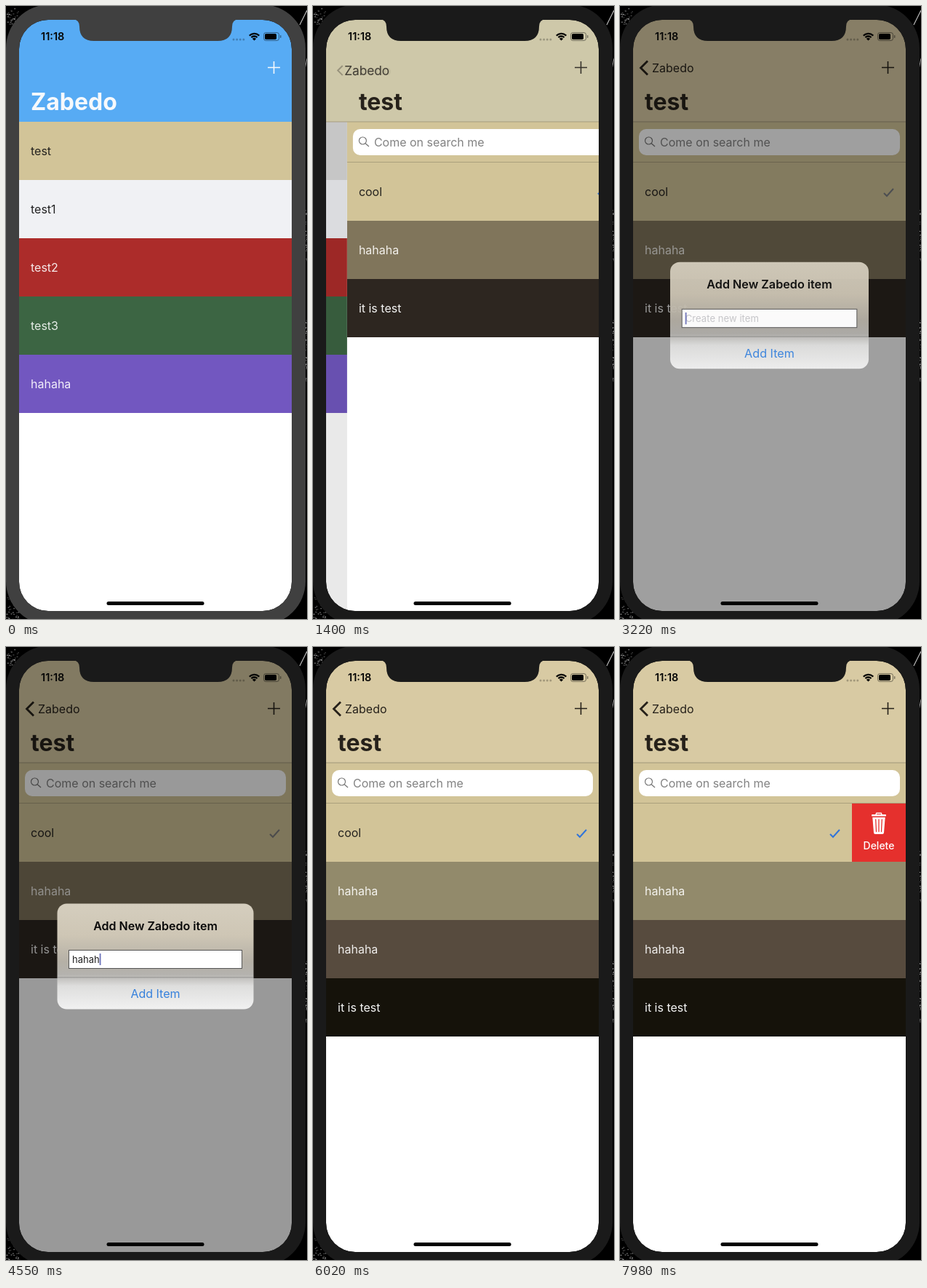
Animation, 414 px wide and 842 px high, one loop 8000 ms. Source, as an HTML page with a canvas:

```html
<!DOCTYPE html>
<html lang="en">
<head>
<meta charset="utf-8">
<title>To-do list</title>
<style>
html, body { margin: 0; width: 100%; height: 100%; overflow: hidden; background: #000; }
canvas { display: block; width: 414px; height: 842px; }
</style>
</head>
<body>
<canvas id="stage" width="414" height="842"></canvas>
<script>
const ctx = document.getElementById('stage').getContext('2d');
const LOOP = 8000, LEFT = 18, WIDTH = 375, ROW = 80;
const APP = 'Zabedo';
const BLUE = [87, 171, 244], SAND = [216, 202, 163], DARK = [38, 33, 26], WHITE = [246, 249, 252];
const TIME = { bezel: 840, press: 1050, push: 1120, plus: 2520, alert: 3020, type: 3900, submit: 5350, dismiss: 5490, reload: 5950, swipe: 7080 };

const HOME_ROWS = [['test', '#d2c498', '#25231f'], ['test1', '#f0f1f4', '#222'], ['test2', '#ac2c2a', '#f6e9e9'],
  ['test3', '#3c6543', '#e6ede7'], ['hahaha', '#7257c0', '#f2effa']];
const OLD_ROWS = [['cool', '#d2c498', '#25231f'], ['hahaha', '#80755b', '#f2f0eb'], ['it is test', '#2d2620', '#f5f5f4']];
const NEW_ROWS = [['cool', '#d2c498', '#25231f'], ['hahaha', '#928a6b', '#f4f3ee'], ['hahaha', '#574b3e', '#f0eeec'], ['it is test', '#15120a', '#f5f5f4']];

const clamp = v => Math.max(0, Math.min(1, v));
const lerp = (a, b, p) => a + (b - a) * p;
const smooth = p => (p = clamp(p), p * p * (3 - 2 * p));
const rgb = c => `rgb(${c.map(Math.round)})`;
const mix = (a, b, p) => rgb(a.map((v, i) => lerp(v, b[i], p)));

// Critically damped spring from 0 to 1.
function spring(ms, rate) {
  const x = Math.max(0, ms) / 1000 * rate;
  const p = 1 - (1 + x) * Math.exp(-x);
  return p > 0.998 ? 1 : p;
}

function box(x, y, w, h, fill, radius = 0) {
  ctx.fillStyle = fill;
  ctx.beginPath();
  ctx.roundRect(x, y, w, h, radius);
  ctx.fill();
}

function text(str, x, y, size, color, weight = 400, align = 'left') {
  ctx.font = `${weight} ${size}px Inter, sans-serif`;
  ctx.textAlign = align;
  ctx.fillStyle = color;
  ctx.fillText(str, x, y);
}

function line(points, color, width, cap = 'butt') {
  ctx.beginPath();
  points.forEach(([x, y]) => ctx.lineTo(x, y));
  ctx.strokeStyle = color;
  ctx.lineWidth = width;
  ctx.lineCap = cap;
  ctx.stroke();
}

function scoped(alpha, draw) {
  ctx.save();
  ctx.globalAlpha *= alpha;
  draw();
  ctx.restore();
}

function drawBackdrop() {
  box(0, 0, 414, 842, '#000');
  let seed = 7;
  const random = () => (seed = seed * 16807 % 2147483647) / 2147483647;
  const specks = (x, y, w, h, count) => {
    for (let i = 0; i < count; i++) {
      const shade = 60 + random() * 110;
      box(x + random() * w, y + random() * h, 2, 1, rgb([shade, shade, shade]));
    }
  };
  specks(0, 2, 16, 24, 30);
  specks(0, 812, 18, 30, 45);
  specks(411, 280, 3, 70, 26);
  specks(411, 430, 3, 90, 34);
  line([[404, 26], [414, 6]], '#bbb', 1.2);
  line([[410, 92], [414, 72]], '#999', 1);
}

function drawBezel(color) {
  ctx.fillStyle = color;
  ctx.beginPath();
  ctx.roundRect(0, -2, 412, 852, 60);
  ctx.roundRect(LEFT, 19, WIDTH, 812, 40);
  ctx.fill('evenodd');
  ctx.fill(new Path2D('M92 18Q101 19 101 28Q101 48 121 48H291Q311 48 311 28Q311 19 320 18Z'));
}

function drawStatus() {
  text('11:18', 48, 47, 14.5, '#050505', 600);
  for (let i = 0; i < 4; i++) box(311.5 + i * 4.6, 44.5, 3, 3, 'rgba(0,0,0,.25)', 1.5);
  ctx.strokeStyle = '#000';
  ctx.lineWidth = 2.3;
  ctx.lineCap = 'butt';
  for (const r of [5.5, 9.2]) {
    ctx.beginPath();
    ctx.arc(341.5, 47, r, -Math.PI * 0.76, -Math.PI * 0.24);
    ctx.stroke();
  }
  ctx.fillStyle = '#000';
  ctx.beginPath();
  ctx.moveTo(341.5, 47.5);
  ctx.arc(341.5, 47.5, 3.6, -Math.PI * 0.76, -Math.PI * 0.24);
  ctx.fill();
  ctx.strokeStyle = 'rgba(0,0,0,.45)';
  ctx.lineWidth = 1;
  ctx.beginPath();
  ctx.roundRect(354.5, 36.5, 21, 11, 3);
  ctx.stroke();
  box(356, 38, 16, 8, '#000', 1.8);
  box(377, 40, 1.4, 4, 'rgba(0,0,0,.45)', 0.7);
}

function drawRow([label, fill, color], y, shift = 0) {
  box(LEFT, y, WIDTH, ROW, fill);
  text(label, 34 + shift, y + 46, 16, color);
}

function drawHome(p, pressed) {
  ctx.save();
  ctx.translate(-112 * p, 0);
  box(LEFT, 159, WIDTH + 112, 672, '#fff');
  HOME_ROWS.forEach((row, i) => {
    drawRow(i === 0 && pressed ? [row[0], '#d9d9d9', row[2]] : row, 159 + i * ROW);
  });
  ctx.restore();
  box(LEFT, 159, WIDTH, 672, `rgba(0,0,0,${0.095 * p})`);
}

function drawDelete(x) {
  box(x, 215, 393 - x, ROW, '#e5302d');
  ctx.save();
  ctx.translate(x + 37, 0);
  box(-10, 230, 20, 2.6, '#fff', 1);
  line([[-4, 230], [-3.2, 228.2], [3.2, 228.2], [4, 230]], '#fff', 1.5);
  ctx.fillStyle = '#fff';
  ctx.fill(new Path2D('M-8.7 234H8.7L7 255Q6.8 257 5 257H-5Q-6.8 257 -7 255Z'));
  for (const i of [-1, 0, 1]) line([[i * 4.3, 237], [i * 3.5, 253.5]], '#e5302d', 1.3, 'round');
  text('Delete', 0, 278, 14, '#fff', 500, 'center');
  ctx.restore();
}

function drawDetail(p, rows, swipe, alertAmount) {
  ctx.save();
  ctx.translate(WIDTH * (1 - p), 0);
  box(LEFT, 159, WIDTH, 672, '#fff');
  box(LEFT, 159, WIDTH, 56, '#d2c498');
  box(26, 169, 359, 36, '#fff', 10);
  ctx.strokeStyle = '#777';
  ctx.lineWidth = 1.2;
  ctx.beginPath();
  ctx.arc(39.5, 185, 5, 0, 7);
  ctx.stroke();
  line([[43.2, 188.7], [48, 193]], '#777', 1.3);
  text('Come on search me', 55, 192.5, 16, '#828282');
  ctx.beginPath();
  ctx.rect(LEFT, 159, WIDTH, 672);
  ctx.clip();
  rows.forEach((row, i) => drawRow(row, 215 + i * ROW, i ? 0 : -swipe));
  box(LEFT, 214, WIDTH, 1, '#aba07c');
  line([[363, 257], [367, 261], [376, 251]].map(([x, y]) => [x - swipe, y]),
    mix([48, 116, 218], [125, 125, 125], alertAmount), 2);
  if (swipe > 0.2) drawDelete(393 - swipe);
  ctx.restore();
}

function drawNav(p, plusAlpha) {
  const ink = mix(WHITE, DARK, p);
  box(LEFT, 19, WIDTH, 140, mix(BLUE, SAND, p));
  if (p > 0) scoped(p, () => box(LEFT, 158.5, WIDTH, 1, '#a2977a'));
  scoped(plusAlpha, () => {
    line([[360, 84.5], [377, 84.5]], ink, 1.6);
    line([[368.5, 76], [368.5, 93]], ink, 1.6);
  });

  // The large title shrinks into the back button.
  const size = lerp(32, 16, p), x = lerp(34, 44, p), y = lerp(131, 85, p) + size * 0.36;
  if (p < 1) scoped(1 - p, () => text(APP, x, y, size, ink, 700));
  if (p > 0) scoped(p, () => text(APP, x, y, size, ink));
  if (p > 0) text('test', 34 + WIDTH * (1 - p), 143, 32, rgb(DARK), 700);

  scoped(clamp((p - 0.88) / 0.12), () => {
    const scale = 1 - (1 - p) * 4;
    ctx.translate(28 + (1 - p) * 75, lerp(131, 85, p));
    ctx.scale(scale, scale);
    line([[10, -9.5], [0.5, 0], [10, 9.5]], ink, 2.8);
  });
}

function drawAlert(t, alpha, scale) {
  scoped(alpha, () => {
    ctx.translate(205.5, 425);
    ctx.scale(scale, scale);
    ctx.translate(-205.5, -425);

    const glass = ctx.createLinearGradient(0, 352.5, 0, 497.5);
    [[0, '#d5cebe'], [0.3, '#cec6b5'], [0.55, '#b5b0a6'], [0.67, '#b4b2ae'], [0.78, '#dededd'], [1, '#f1f1f1']]
      .forEach(stop => glass.addColorStop(...stop));
    box(70.5, 352.5, 270, 145, glass, 13);
    if (t > TIME.submit && t < TIME.dismiss) {
      box(70.5, 454, 270, 43.5, 'rgba(0,0,0,.08)', [0, 0, 13, 13]);
    }
    text('Add New ' + APP + ' item', 205.5, 388.5, 16, '#080808', 600, 'center');
    box(86.5, 416.5, 238, 25, '#fff');
    ctx.strokeStyle = '#555';
    ctx.lineWidth = 1;
    ctx.strokeRect(86.5, 416.5, 238, 25);

    const typed = 'hahaha'.slice(0, Math.max(0, Math.floor((t - TIME.type) / 150) + 1));
    text(typed || 'Create new item', 91, 433.5, 13, typed ? '#222' : '#c3c3c6');
    const typing = t > TIME.type && t < TIME.type + 900;
    if (t > 3130 && t < TIME.submit && (typing || (t - 3130) % 1000 < 550)) {
      const caret = 91 + (typed ? ctx.measureText(typed).width : 0);
      box(caret, 421, 1.8, 16, '#6a70b8');
    }
    box(70.5, 453.5, 270, 0.8, 'rgba(60,60,60,.45)');
    text('Add Item', 205.5, 482, 16, '#3580dc', 400, 'center');
  });
}

function drawTouch(t) {
  const alpha = smooth((t - 3000) / 60) * (1 - smooth((t - 3110) / 90));
  if (!alpha) return;
  scoped(alpha * 0.75, () => {
    ctx.beginPath();
    ctx.arc(57, 417, 12, 0, 7);
    ctx.fillStyle = 'rgba(110,108,105,.55)';
    ctx.fill();
    ctx.strokeStyle = '#686663';
    ctx.lineWidth = 2;
    ctx.stroke();
  });
}

function draw(t) {
  const push = spring(t - TIME.push, 15);
  const shown = spring(t - TIME.alert, 23);
  const alertAmount = shown * (1 - spring(t - TIME.dismiss, 23));
  const swipe = 74 * smooth((t - TIME.swipe) / 750);
  const plusAlpha = t < TIME.plus ? 1 : lerp(0.3, 1, smooth((t - 2660) / 250));

  drawBackdrop();
  ctx.save();
  ctx.beginPath();
  ctx.roundRect(LEFT, 19, WIDTH, 812, 40);
  ctx.clip();
  if (push < 1) drawHome(push, t >= TIME.press);
  if (push > 0) drawDetail(push, t < TIME.reload ? OLD_ROWS : NEW_ROWS, swipe, alertAmount);
  drawNav(push, plusAlpha);
  box(LEFT, 19, WIDTH, 812, `rgba(0,0,0,${0.4 * alertAmount})`);
  if (alertAmount > 0) drawAlert(t, alertAmount, lerp(1.2, 1, shown));
  drawTouch(t);
  ctx.restore();
  drawBezel(t < TIME.bezel ? '#404040' : '#1a1a1a');
  drawStatus();
  box(138.5, 818, 134, 5, '#000', 2.5);
}

const start = performance.now();
function tick() {
  draw((performance.now() - start) % LOOP);
  requestAnimationFrame(tick);
}
tick();
</script>
</body>
</html>
```
